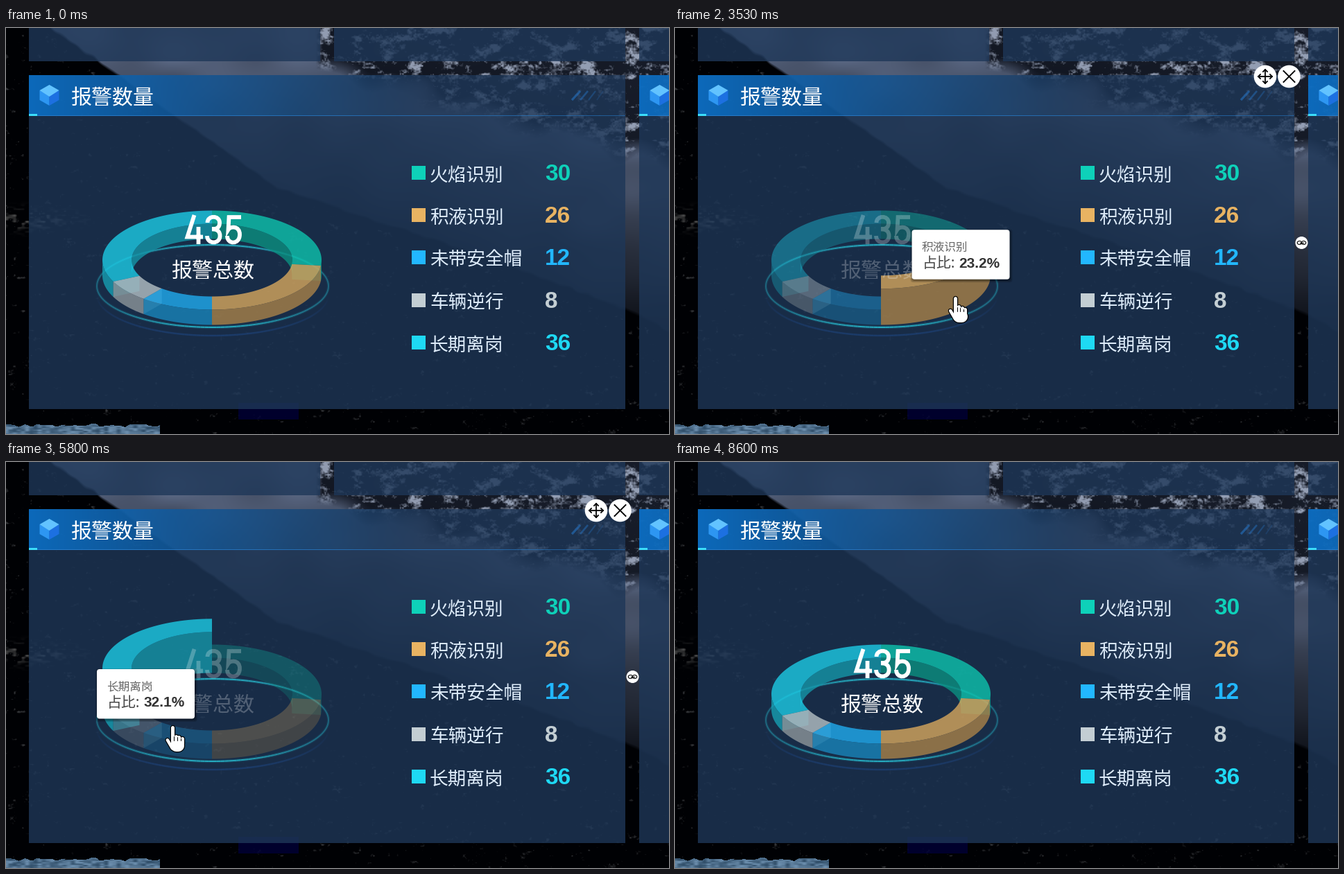
Write a matplotlib script that moves like this. It is 956 by 586 pixels and loops after 9.4 s.

```python
import numpy as np
import matplotlib.pyplot as plt
from matplotlib.animation import FuncAnimation
from matplotlib.collections import LineCollection
from matplotlib.patches import Circle, Ellipse, FancyBboxPatch, PathPatch, Polygon, Rectangle
from matplotlib.path import Path

W, H, DPI = 956, 586, 64
LOOP, STEP = 9400, 50
PT = 72 / DPI
CJK, SANS = "Noto Sans CJK JP", "Liberation Sans"

fig = plt.figure(figsize=(W / DPI, H / DPI), dpi=DPI, facecolor="black")
ax = fig.add_axes([0, 0, 1, 1])
ax.set_xlim(0, W)
ax.set_ylim(H, 0)
ax.axis("off")


def rgb(r, g, b):
    return np.array([r, g, b]) / 255


# ---- backdrop -------------------------------------------------------------
rng = np.random.default_rng(11)
Y, X = np.mgrid[0:H, 0:W].astype(float)


def noise(cx, cy):
    grid = rng.random((H // cy + 2, W // cx + 2))
    u, v = X / cx, Y / cy
    i, j = u.astype(int), v.astype(int)
    u, v = u - i, v - j
    u, v = u * u * (3 - 2 * u), v * v * (3 - 2 * v)
    upper = grid[j, i] * (1 - u) + grid[j, i + 1] * u
    lower = grid[j + 1, i] * (1 - u) + grid[j + 1, i + 1] * u
    return upper * (1 - v) + lower * v


def fractal(size):
    cells = [max(size >> k, 2) for k in range(4)]
    weights = 0.72 ** np.arange(4)
    return sum(w * noise(c, max(c * 2 // 3, 2)) for w, c in zip(weights, cells)) / weights.sum()


def mix(img, color, alpha):
    alpha = np.asarray(alpha, float)[..., None]
    return img * (1 - alpha) + np.asarray(color) * alpha


def inside(x0, y0, x1, y1):
    return (X >= x0) & (X < x1) & (Y >= y0) & (Y < y1)


def backdrop():
    img = np.ones((H, W, 3)) * rgb(0, 1, 4)

    # mist above the mountain ridge, thinning downwards
    ridge = np.interp(X, [0, 130, 390, 720, 893, 956], [-45, 48, 232, 342, 408, 440])
    ridge += (noise(14, 14) - 0.5) * 5
    right = np.clip((X - 500) / 400, 0, 1)
    amount = np.clip(1.05 - Y / (330 + 130 * right), 0, 1) * (1 + 0.45 * right)
    mist = amount * np.clip((ridge - Y) / 5, 0, 1) * (0.85 + 0.3 * noise(60, 40))
    img += mist[..., None] * rgb(88, 100, 124)

    # snowy rocks, upper right
    snow = np.clip((fractal(22) - 0.52) * 5, 0, 1)
    edge = 62 + (X - 453) * 0.29 + (noise(40, 40) - 0.5) * 30
    area = np.clip((edge - Y) / 26, 0, 1) * np.clip((X - 446) / 10, 0, 1)
    img = mix(img, rgb(12, 16, 26) + snow[..., None] * rgb(140, 146, 156), area * 0.9)

    # sparse stones on the dark slopes
    stones = np.clip((fractal(12) - 0.69) * 6, 0, 1)
    img = mix(img, rgb(105, 107, 110), stones * (Y > ridge + 8) * 0.5)
    patch = np.exp(-((X - 40) / 55) ** 2 - ((Y - 276) / 13) ** 2)
    img = mix(img, rgb(120, 120, 118), patch * np.clip((noise(6, 3) - 0.5) * 2, 0, 1))

    # blue water at the bottom
    img = mix(img, rgb(0, 0, 58), inside(335, 541, 422, 565) * 0.75)
    water = rgb(48, 78, 105) + noise(6, 2)[..., None] * rgb(65, 70, 75)
    img = mix(img, water, (X < 222) & (Y > 570 + 6 * noise(9, 9)))

    # translucent panels
    panels = ((33, 0, 453, 48), (473, 0, 893, 48), (913, 0, W, 48),
              (33, 68, 893, 550), (913, 68, W, 550))
    img = mix(img, rgb(30, 55, 88), sum(inside(*p) for p in panels) * 0.8)

    # header bars
    for x0 in (33, 913):
        u = np.clip((X - x0) / 860, 0, 1)
        x1 = x0 + 860
        shade = 0.86 * np.clip(1 - 1.5 * u, 0, 1) ** 1.15
        img = mix(img, rgb(10, 115, 205), inside(x0, 68, x1, 126) * shade)
        img = mix(img, rgb(38, 125, 205), inside(x0, 125.5, x1, 127) * (1 - 0.45 * u))
        img = mix(img, rgb(60, 222, 250), inside(x0, 124, x0 + 12, 127))
    return np.clip(img, 0, 1)


ax.imshow((backdrop() * 255).astype(np.uint8), extent=(0, W, H, 0),
          interpolation="nearest", aspect="auto")


# ---- static parts ---------------------------------------------------------
def text(x, y, s, px, color="white", font=CJK, weight="normal", z=20):
    base = y + px * (0.38 if font == CJK else 0.345)
    return ax.text(x, base, s, fontsize=px * PT, color=color, family=font,
                   weight=weight, va="baseline", zorder=z)


def line(pts, color, px, z=20, **kw):
    xs, ys = zip(*pts)
    return ax.plot(xs, ys, color=color, lw=px * PT, zorder=z, **kw)[0]


def shape(pts, color, z=20):
    return ax.add_patch(Polygon(pts, facecolor=color, lw=0, zorder=z))


def cube(x, y):
    for s, color in ((-14, rgb(45, 150, 242)), (14, rgb(28, 112, 225))):
        shape([(x + s, y - 7), (x, y), (x, y + 15), (x + s, y + 7)], color)
    shape([(x, y - 15), (x + 14, y - 7), (x, y + 2), (x - 14, y - 7)], rgb(98, 195, 255))


cube(62.5, 97)
cube(942.5, 97)
text(93, 99, "报警数量", 30)
for k in range(4):
    x = 816 + 12 * k
    line([(x, 104), (x + 12 - k, 91)], rgb(38, 115, 195), 3.2 - 0.5 * k,
         alpha=0.6 - 0.13 * k, solid_capstyle="butt")

NAMES = ["火焰识别", "积液识别", "未带安全帽", "车辆逆行", "长期离岗"]
VALUES = np.array([30, 26, 12, 8, 36])
SHARES = VALUES / VALUES.sum()
COLORS = [rgb(14, 209, 185), rgb(232, 179, 98), rgb(34, 183, 255),
          rgb(195, 206, 211), rgb(30, 217, 244)]

for k, (name, value, color) in enumerate(zip(NAMES, VALUES, COLORS)):
    y = 209 + 61.2 * k
    ax.add_patch(Rectangle((585, y - 10), 20.5, 20, facecolor=color, lw=0, zorder=20))
    text(611, y + 1.5, name, 26.67, rgb(222, 236, 250))
    text(777, y - 0.5, str(value), 33.33, color, SANS, "bold")


def glow(cy, ry, color, alpha, width):
    a = np.linspace(0, 2 * np.pi, 181)
    pts = np.column_stack([298 + 167 * np.cos(a), cy + ry * np.sin(a)])
    rgba = np.column_stack([np.tile(color, (180, 1)), alpha(np.sin(a[:-1]))])
    ax.add_collection(LineCollection(np.stack([pts[:-1], pts[1:]], 1), colors=rgba,
                                     linewidths=width * PT, zorder=3))


glow(385, 59, rgb(32, 75, 140), lambda s: 0.5 * np.clip(s, 0, 1), 2.5)
glow(372.5, 59.5, rgb(35, 180, 200), lambda s: 0.08 + 0.1 * s ** 2, 4.5)
glow(372.5, 59.5, rgb(40, 185, 205), lambda s: 0.38 + 0.5 * s ** 4, 2)

# ---- ring chart -----------------------------------------------------------
CX, CY, THICK = 297, 357, 22
OUT, IN = (158, 71.5), (116, 52.5)
ENDS = np.concatenate([[0], np.cumsum(SHARES)]) * 360


def arc(r, a0, a1, z):
    a = np.radians(np.linspace(a0, a1, 48))
    return np.column_stack([CX + r[0] * np.sin(a), CY - z - r[1] * np.cos(a)])


def band(p, q):
    return np.vstack([p, q[::-1]])


def wall(r, a0, a1, h):
    a1 = max(a0, a1)
    return band(arc(r, a0, a1, 0), arc(r, a0, a1, h))


def faces(a0, a1, h):
    """Inner wall, cut face, top and outer wall of one slice."""
    back = (max(a0, 270), a1) if a0 >= 179 else (a0, min(a1, 90))
    cut = a1 if a1 < 181 else a0
    return [wall(IN, *back, h),
            band(*(np.vstack([arc(r, cut, cut, z)[:1] for r in (OUT, IN)]) for z in (0, h))),
            band(arc(OUT, a0, a1, h), arc(IN, a0, a1, h)),
            wall(OUT, max(a0, 90), min(a1, 270), h)]


SHADES, STRENGTHS = (0.7, 0.92, 0.95, 0.74), (1, 0.5, 1, 1)
slices = {k: [shape(p, COLORS[k] * s, 5 + z)
              for p, s in zip(faces(ENDS[k], ENDS[k + 1], THICK), SHADES)]
          for z, k in enumerate((4, 0, 1, 3, 2))}

# ---- total in the middle --------------------------------------------------
M, L, C = Path.MOVETO, Path.LINETO, Path.CURVE4
FOUR = Path([(271.5, 270), (261.5, 301.5), (284, 301.5), (277.5, 287), (277.5, 312)],
            [M, L, L, M, L])
THREE = Path([(290.5, 281), (290.5, 270), (308, 270), (308, 281), (308, 288), (304, 290.3),
              (297, 290.3), (305, 290.3), (308.5, 294), (308.5, 300), (308.5, 312.5),
              (290, 312.5), (290, 300)], [M] + [C] * 12)
FIVE = Path([(339, 273), (321.5, 273), (320.5, 291), (323, 286), (337, 285), (337, 298),
             (337, 313), (319, 313), (319, 300)], [M, L, L] + [C] * 6)
total = [ax.add_patch(PathPatch(p, fill=False, edgecolor="white", lw=5.8 * PT,
                                capstyle="butt", joinstyle="miter", zorder=15))
         for p in (FOUR, THREE, FIVE)]
total.append(text(238, 349, "报警总数", 30, z=15))

# ---- hover controls -------------------------------------------------------
controls = [ax.add_patch(Circle(c, r, facecolor="white", lw=0, zorder=25))
            for c, r in (((851, 70), 16.3), ((885.5, 70), 16.3), ((903.5, 310), 9))]
for d in np.array([(1, 0), (-1, 0), (0, 1), (0, -1)]):
    mid, n = np.array([851, 70]), d[::-1]
    tip = mid + 10 * d
    controls += [line([mid, tip], "black", 1.8, 26),
                 line([tip - 3 * d + 3 * n, tip, tip - 3 * d - 3 * n], "black", 1.8, 26)]
for s in (1, -1):
    controls.append(line([(877.5, 70 - 8 * s), (893.5, 70 + 8 * s)], "black", 1.9, 26))
    controls.append(ax.add_patch(Ellipse((903.5 + 3 * s, 310), 6.5, 5, fill=False,
                                         edgecolor="black", lw=1.1 * PT, zorder=26)))
controls.append(line([(901, 310), (906, 310)], "black", 1.2, 26))


def box(color, alpha, z):
    return ax.add_patch(FancyBboxPatch((0, 0), 1, 1, boxstyle="round,pad=0,rounding_size=4",
                                       facecolor=color, alpha=alpha, lw=0, zorder=z))


shadows = [box("black", 0.12, 30) for _ in range(4)]
card = box("white", 1, 31)
labels = [text(0, 0, "", 16.67, "#666666", z=32),
          text(0, 0, "占比:", 20.83, "#444444", z=32),
          text(0, 0, "", 20.83, "#333333", SANS, "bold", z=32)]
LABEL_AT = np.array([(14, 30.3), (15, 54.9), (68, 54.4)])
card_parts = [*shadows, card, *labels]

# hand pointer built from round strokes: finger, knuckles, thumb, palm
STROKES = np.array([[(0, 2), (0, 24)]]
                   + [[(4.7 * k, 12.5 + 1.8 * k), (4.7 * k, 25)] for k in (1, 2, 3)]
                   + [[(-7, 20), (0, 32)], [(5, 28), (8.5, 28)]], float)
WIDTHS = np.array([5, 5, 5, 5, 4.5, 17])
CREASES = np.array([[(x, 14 + 0.3 * x), (x, 21)] for x in (2.4, 7.1, 11.8)])


def strokes(color, widths, z):
    return ax.add_collection(LineCollection([], colors=color, linewidths=widths * PT,
                                            capstyle="round", zorder=z))


hand = [(strokes("black", WIDTHS + 2.4, 40), STROKES), (strokes("white", WIDTHS, 41), STROKES),
        (strokes("black", np.ones(3), 42), CREASES)]

# ---- motion ---------------------------------------------------------------
# pointer stops: arrival time, x, y
STOPS = np.array([(530, 200, 602), (870, 158, 332), (1070, 147, 325), (2200, 371, 308),
                  (3050, 570, 462), (3330, 425, 397), (3530, 404, 388), (4800, 226, 280),
                  (5000, 174, 340), (5450, 215, 405), (6100, 330, 295), (6400, 244, 317),
                  (6600, 193, 313), (7850, 886, 74), (8470, 870, 602)], float)
# hovered slice from each moment on
HOVERS = [(870, 4), (2000, 0), (2900, None), (3250, 1), (4500, 4), (6000, 0), (6480, 4),
          (8130, None)]
TRAVEL, LAG, CARD_OFFSET = 400, 200, np.array([-84, -106])


def ramp(t, start, length):
    s = np.clip((t - start) / length, 0, 1)
    return s * s * (3 - 2 * s)


def pointer(t):
    pos = STOPS[0, 1:]
    for (t0, *_), (t1, *goal) in zip(STOPS, STOPS[1:]):
        start = max(t0, t1 - TRAVEL)
        pos = pos + (np.array(goal) - pos) * ramp(t, start, t1 - start)
    return pos


def focus(t, length):
    level = np.zeros(len(VALUES))
    for (t0, k), (t1, _) in zip(HOVERS, HOVERS[1:]):
        if k is not None:
            level[k] += ramp(t, t0, length) - ramp(t, t1, length)
    return level


def place_card(t):
    k = next((k for t0, k in reversed(HOVERS) if t >= t0), None)
    shown = k is not None and pointer(t)[0] < 480
    for part in card_parts:
        part.set_visible(shown)
    if not shown:
        return
    x, y = corner = pointer(t - LAG) + CARD_OFFSET
    for g, s in enumerate(shadows):
        s.set_bounds(x - g + 1, y - g + 2, 141 + 2 * g, 71 + 2 * g)
    card.set_bounds(x, y, 141, 71.5)
    labels[0].set_text(NAMES[k])
    labels[2].set_text(f"{SHARES[k]:.1%}")
    for label, offset in zip(labels, LABEL_AT):
        label.set_position(corner + offset)


def draw(i):
    t = i * STEP + 20
    lift = focus(t, 130) * (12 + 0.7 * VALUES)
    level = focus(t, 400)
    fade = 1 - 0.65 * (level.sum() - level)
    for k, parts in slices.items():
        shapes = faces(ENDS[k], ENDS[k + 1], THICK + lift[k])
        for part, pts, strength in zip(parts, shapes, STRENGTHS):
            part.set_xy(pts)
            part.set_alpha(0.78 * fade[k] * strength)
    for part in total:
        part.set_alpha(1 - 0.75 * (ramp(t, 600, 250) - ramp(t, 8130, 250)))
    for part in controls:
        part.set_visible(600 <= t < 8350)
    place_card(t)
    for part, segments in hand:
        part.set_segments(segments + pointer(t))
        part.set_visible(530 <= t < 8500)
    return []


anim = FuncAnimation(fig, draw, frames=LOOP // STEP, interval=STEP, repeat=True,
                     init_func=lambda: draw(0), cache_frame_data=False)
plt.show()
```
